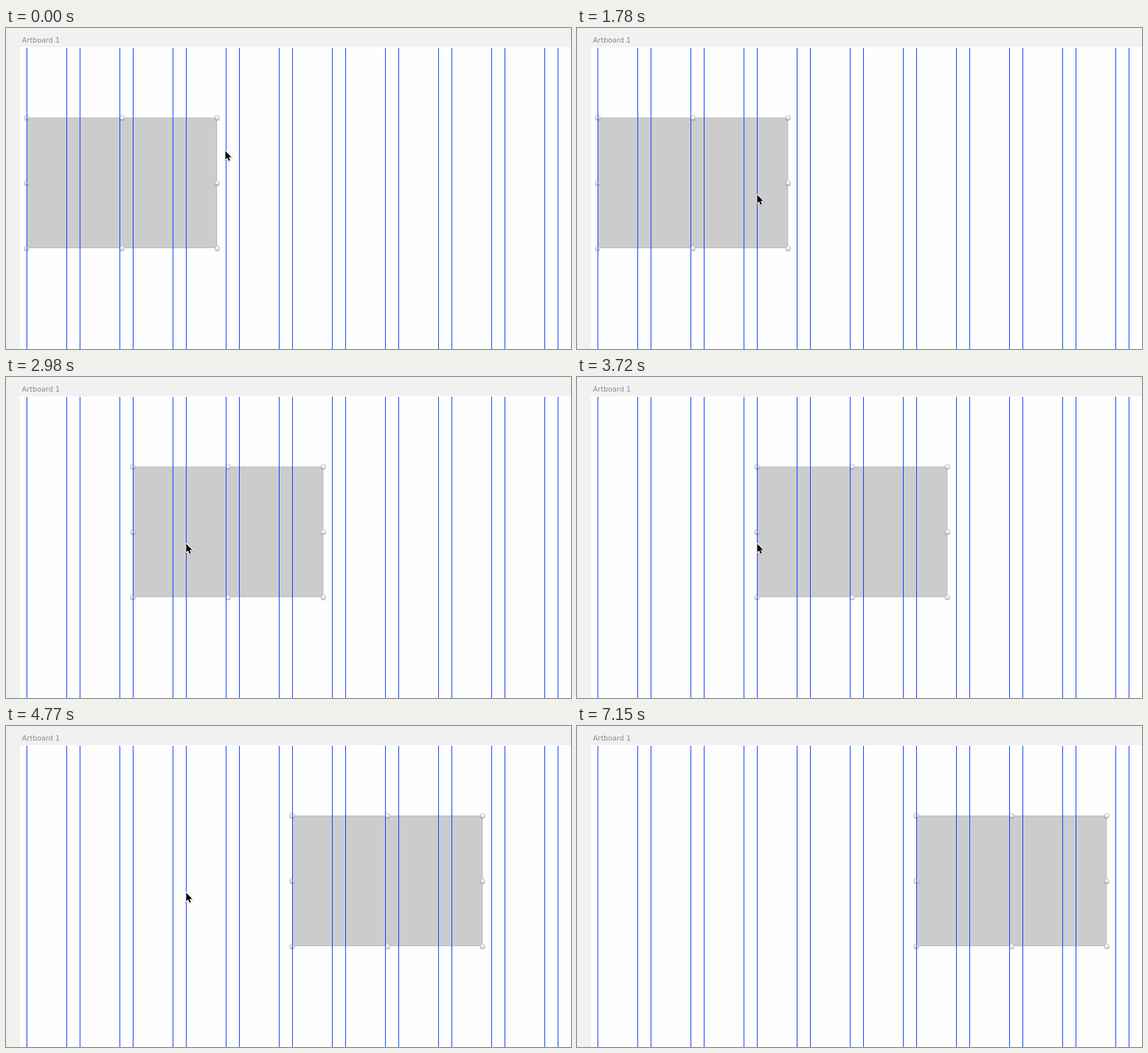
An HTML page for the animation above (7.41 s loop, 851x484 px).

```html
<!DOCTYPE html>
<html lang="en">
<head>
<meta charset="utf-8">
<title>Grid nudge</title>
<style>
  html, body { margin: 0; width: 100%; height: 100%; overflow: hidden; background: #f1f1f1; }
  svg { display: block; width: 851px; height: 484px; }
  text { font: 10.7px "DejaVu Sans", sans-serif; fill: #8a8a8a; }
</style>
</head>
<body>
<svg viewBox="0 0 851 484">
  <defs>
    <linearGradient id="knob" x2="0" y2="1">
      <stop offset="0" stop-color="#fff"/>
      <stop offset="1" stop-color="#e2e2e2"/>
    </linearGradient>
    <g id="handle">
      <rect x="-3.5" y="-2" width="7" height="6.5" rx="1.5" opacity=".22"/>
      <rect x="-3" y="-3" width="6" height="6" rx="1" fill="url(#knob)" stroke="#aaa" stroke-width=".7"/>
    </g>
    <path id="arrow" d="M1.4 1.4V14.2L4.3 11.4L6.4 16.2L8.5 15.3L6.4 10.7H10.6Z"/>
  </defs>
  <rect x="21" y="29" width="830" height="455" fill="#fefefe"/>
  <text x="24" y="22">Artboard 1</text>
  <g id="box">
    <rect width="287" height="197" fill="#ccc"/>
    <rect id="hover" width="287" height="197" fill="none" stroke="#3dbcff" stroke-width="2"/>
    <g id="selection">
      <rect x=".5" y=".5" width="286" height="196" fill="none" stroke="#bcbcbc"/>
    </g>
  </g>
  <path id="guides" fill="none" stroke="#0433ff"/>
  <g id="cursor">
    <use href="#arrow" y="1" stroke="#000" stroke-width="2" opacity=".2"/>
    <use href="#arrow" stroke="#fff" stroke-width="2" stroke-linejoin="round"/>
    <use href="#arrow"/>
  </g>
</svg>
<script>
const LOOP = 7410, TICK = 149.2, LEAD = 16;
const COLUMN = 80, GUTTER = 20, WIDTH = 287, HEIGHT = 197;
const NUDGES = [17, 20, 25, 29, 32, 36];
const LEAVE = 43, GONE = 48;
const rest = { x: 270, y: 250 };

const $ = id => document.getElementById(id);
const show = (id, on) => $(id).setAttribute("visibility", on ? "visible" : "hidden");
const place = (el, x, y) => el.setAttribute("transform", `translate(${x} ${y})`);
const sigmoid = n => 1 / (1 + Math.exp(-2.6 * n));

function build() {
  let d = "";
  for (let x = 31.5; x < 851; x += COLUMN) {
    d += `M${x} 30V484M${x + COLUMN - GUTTER} 30V484`;
  }
  $("guides").setAttribute("d", d);

  for (let i = 0; i < 9; i++) {
    if (i === 4) continue;
    const use = document.createElementNS("http://www.w3.org/2000/svg", "use");
    use.setAttribute("href", "#handle");
    place(use, (i % 3) * WIDTH / 2, Math.floor(i / 3) * HEIGHT / 2);
    $("selection").append(use);
  }
}

function goal(tick) {
  if (tick <= 3) return { x: 389, y: 190 };
  if (tick <= 6) return { x: 331, y: 270 };
  return rest;
}

function cursorAt(tick) {
  // Sweep out to the corner, sideways first
  if (tick > LEAVE) {
    const n = tick - LEAVE;
    return { x: rest.x + 512 * sigmoid(n - 1.8), y: rest.y + 215 * sigmoid(n - 2.3) };
  }
  // Glide most of the way to the current goal on each tick
  let x = 329, y = 184;
  for (let i = 1; i <= tick; i++) {
    const to = goal(i);
    x += (to.x - x) * 0.87;
    y += (to.y - y) * 0.87;
  }
  return { x, y };
}

function draw(t) {
  const tick = Math.floor((t + LEAD) / TICK);
  const steps = NUDGES.filter(n => tick >= n).length;
  place($("box"), 31 + steps * COLUMN, 135);
  show("selection", tick < 1 || tick > 8);
  show("hover", tick === 7 || tick === 8);

  const { x, y } = cursorAt(tick);
  place($("cursor"), Math.round(x), Math.round(y));
  show("cursor", tick < GONE);
}

build();
const began = performance.now();
function tickFrame() {
  draw((performance.now() - began) % LOOP);
  requestAnimationFrame(tickFrame);
}
tickFrame();
</script>
</body>
</html>
```
